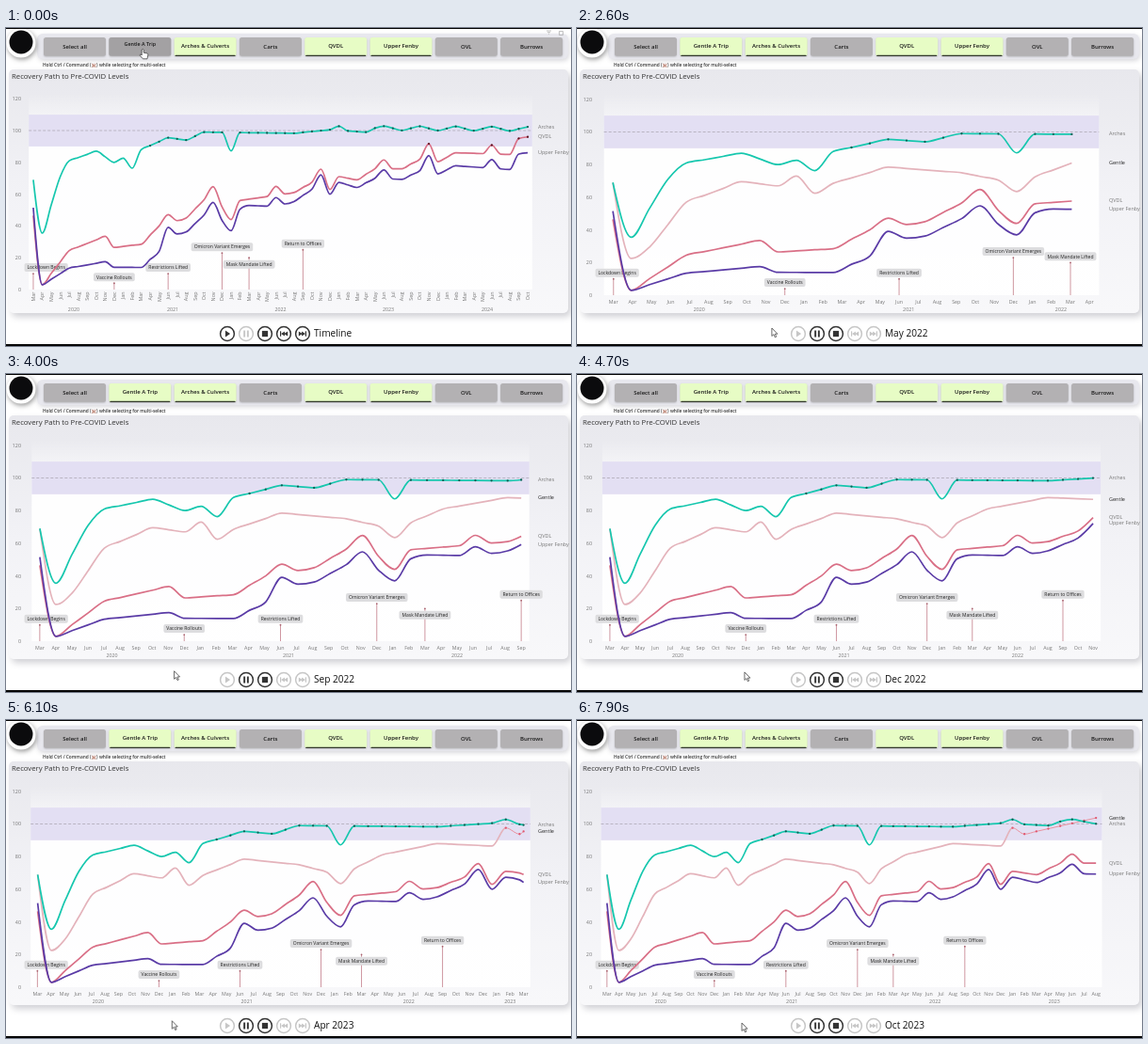
These frames come from a looping animation (600x338 px, 8 s). An HTML page with a canvas:

```html
<!DOCTYPE html>
<html lang="en">
<head>
<meta charset="utf-8">
<title>Recovery dashboard</title>
<style>
html, body { margin: 0; width: 100%; height: 100%; overflow: hidden; background: #fff; }
canvas { display: block; width: 600px; height: 338px; }
</style>
</head>
<body>
<canvas id="stage"></canvas>
<script>
const W = 600, H = 338, LOOP = 8000;
const SELECT_AT = 300, LINE_AT = 500, PLAY_AT = 2400;
const LAST = 55; // months are counted from March 2020
const canvas = document.getElementById('stage');
const ctx = canvas.getContext('2d');
const dpr = window.devicePixelRatio || 1;
canvas.width = W * dpr;
canvas.height = H * dpr;

const MONTHS = ['Jan', 'Feb', 'Mar', 'Apr', 'May', 'Jun', 'Jul', 'Aug', 'Sep', 'Oct', 'Nov', 'Dec'];
const EVENTS = [
  ['Lockdown Begins', 0, 10], ['Vaccine Rollouts', 9, 4], ['Restrictions Lifted', 15, 10],
  ['Omicron Variant Emerges', 21, 23], ['Mask Mandate Lifted', 24, 20], ['Return to Offices', 30, 25]
];
const BUTTONS = ['Select all', 'Gentle A Trip', 'Arches & Culverts', 'Carts', 'QVDL', 'Upper Fenby', 'OVL', 'Burrows'];
const CHOSEN = [1, 2, 4, 5];

// Key points: [time, values...]
const PACE = [[2400, 25.3], [3200, 27.9], [4700, 32.7], [6100, 36.15], [8000, 41.95]];
const POINTER = [[0, 142, 22], [900, 142, 22], [1600, 212, 236], [2200, 235, 323], [3000, 179, 315], [8000, 175, 322]];

const clamp = (v, a, b) => Math.min(b, Math.max(a, v));
const mix = (a, b, p) => a + (b - a) * p;

function along(keys, t, ease = p => p) {
  let i = 0;
  while (i < keys.length - 2 && t >= keys[i + 1][0]) i++;
  const a = keys[i], b = keys[i + 1];
  const p = ease(clamp((t - a[0]) / (b[0] - a[0]), 0, 1));
  return a.slice(1).map((v, k) => mix(v, b[k + 1], p));
}

// Trends by month; dips and seasonal peaks are added below
const ARCH_TREND = [[0, 69], [1, 35.5], [3, 71], [4, 81], [7, 87], [9, 80], [12, 88], [15, 95.5],
  [17, 94], [19, 99], [29, 98.3], [33, 100.5], [37, 99], [38, 101.5], [55, 101]];
const DOOR_TREND = [[0, 69], [1, 22.5], [2, 29.5], [4, 57], [7, 69.5], [9, 67], [10, 73], [12, 68.5],
  [15, 78.5], [19, 75], [21, 70.5], [23, 72.5], [25, 81], [29, 88], [33, 86.5], [34, 97.6],
  [35, 93.8], [41, 103.7], [45, 104], [46, 111], [51, 121.5], [55, 127]];
const RAIL_TREND = [[0, 46.5], [1, 3], [4, 24.5], [8, 33.5], [9, 26.5], [12, 28.5], [14, 40], [17, 45],
  [19, 56.5], [21, 52], [23, 56], [29, 61], [31, 67.5], [33, 63], [34, 71], [36, 69], [38, 76],
  [41, 76], [43, 82], [45, 80.4], [47, 86], [53, 85], [54, 95], [55, 96]];
const VALE_GAP = [[0, -5], [1, 0], [4, 11], [8, 16], [9, 12.5], [14, 16], [15, 8], [20, 10],
  [24, 4], [27, 7], [33, 3], [38, 6], [55, 10]];

const winter = i => i === 11 ? 1 : 0;
const wave = i => i === 22 ? 1 : 0;
const yearly = (i, month) => i > 11 && (i + 2) % 12 === month ? 1 : 0;
const wobble = i => i > 37 ? Math.cos((i - LAST) * Math.PI / 2) : 0;

const arch = i => along(ARCH_TREND, i)[0] - 9 * winter(i) - 11.6 * wave(i) + 1.3 * wobble(i) + (i === 34 ? 2.6 : 0);
const door = i => along(DOOR_TREND, i)[0] - 8.3 * winter(i) - 8 * wave(i);
const rail = i => along(RAIL_TREND, i)[0] - 10 * wave(i) + 10.5 * yearly(i, 10) + 5.5 * yearly(i, 5);
const vale = i => rail(i) - along(VALE_GAP, i)[0];

function series(name, value, color, dot, label = '#777') {
  const data = Array.from({ length: LAST + 1 }, (_, i) => value(i));
  return { name, data, color, dot, label };
}
const doorLine = series('Gentle', door, '#e4b3bb', '#e0566f', '#222');
const archLine = series('Arches', arch, '#16c7ae', '#0c5f54');
const railLine = series('QVDL', rail, '#d96f86', '#5e1222');
const valeLine = series('Upper Fenby', vale, '#5a3ba6', '#2b1a55');
doorLine.hot = '#ea929f';

function text(s, x, y, size, color = '#777', align = 'center', weight = 400) {
  ctx.font = `${weight} ${size}px "Open Sans", "Noto Sans", sans-serif`;
  ctx.fillStyle = color;
  ctx.textAlign = align;
  ctx.textBaseline = 'alphabetic';
  ctx.fillText(s, x, y + size * 0.36);
  return ctx.measureText(s).width;
}

function box(x, y, w, h, r, fill) {
  ctx.beginPath();
  ctx.roundRect(x, y, w, h, r);
  ctx.fillStyle = fill;
  ctx.fill();
}

function shadowed(draw, blur, dx, dy, color) {
  ctx.save();
  ctx.shadowColor = color;
  ctx.shadowBlur = blur * dpr;
  ctx.shadowOffsetX = dx * dpr;
  ctx.shadowOffsetY = dy * dpr;
  draw();
  ctx.restore();
}

function disc(x, y, r, fill) {
  ctx.beginPath();
  ctx.arc(x, y, r, 0, 7);
  ctx.fillStyle = fill;
  ctx.fill();
}

function segment(x1, y1, x2, y2, color, width, dash = []) {
  ctx.beginPath();
  ctx.moveTo(x1, y1);
  ctx.lineTo(x2, y2);
  ctx.setLineDash(dash);
  ctx.strokeStyle = color;
  ctx.lineWidth = width;
  ctx.stroke();
  ctx.setLineDash([]);
}

function xScale(n) {
  const step = 542.6 / (n + 1.836);
  return { step, at: i => 20.2 + step * (0.918 + i) };
}

// Tangents of a monotone cubic through the points
function tangents(p) {
  const gap = i => Math.max(0.01, p[i + 1][0] - p[i][0]);
  const slope = i => (p[i + 1][1] - p[i][1]) / gap(i);
  const e = p.length - 1;
  const m = p.map((q, i) => {
    if (i === 0 || i === e) return 0;
    const h0 = gap(i - 1), h1 = gap(i), s0 = slope(i - 1), s1 = slope(i);
    const mean = (s0 * h1 + s1 * h0) / (h0 + h1);
    return (Math.sign(s0) + Math.sign(s1)) * Math.min(Math.abs(s0), Math.abs(s1), Math.abs(mean) / 2);
  });
  m[0] = (3 * slope(0) - m[1]) / 2;
  m[e] = (3 * slope(e - 1) - m[e - 1]) / 2;
  return m;
}

function curve(p, m, from, to, color, width) {
  if (to <= from) return;
  ctx.beginPath();
  ctx.moveTo(p[from][0], p[from][1]);
  for (let i = from; i < to; i++) {
    const [x0, y0] = p[i], [x1, y1] = p[i + 1], d = (x1 - x0) / 3;
    ctx.bezierCurveTo(x0 + d, y0 + d * m[i], x1 - d, y1 - d * m[i + 1], x1, y1);
  }
  ctx.strokeStyle = color;
  ctx.lineWidth = width;
  ctx.lineJoin = 'round';
  ctx.stroke();
}

function drawSeries(s, n, xOf, yOf) {
  const pts = s.data.slice(0, n + 1).map((v, i) => [xOf(i), yOf(v)]);
  const m = tangents(pts);
  const split = s.hot ? Math.min(n, 34) : n;
  curve(pts, m, 0, split, s.color, 1.7);
  if (s.hot) curve(pts, m, split, n, s.hot, 1);
  pts.forEach(([x, y], i) => { if (s.data[i] >= 90) disc(x, y, 1.15, s.dot); });
}

function drawEndLabels(list, n, yOf) {
  const used = [];
  for (const s of list) {
    const y = yOf(s.data[n]);
    if (used.some(u => Math.abs(u - y) < 5)) continue;
    used.push(y);
    text(s.name, 565, y - 0.5, 5.5, s.label, 'left');
  }
}

function drawEvents(n, xs, yOf) {
  for (const [name, at, value] of EVENTS) {
    if (at > n) continue;
    const x = xs.at(at), y = yOf(value);
    const below = at === 24 && xs.step < 17.5;
    segment(x, y, x, yOf(0), '#cf97a1', 1);
    disc(x, y, 0.9, '#a8616d');
    ctx.font = '400 5px "Open Sans", "Noto Sans", sans-serif';
    const w = ctx.measureText(name).width + 6;
    const left = Math.max(19.5, x - w / 2), mid = y + (below ? 7 : -6.5);
    box(left, mid - 4.5, w, 9, 2, '#dddddf');
    text(name, left + w / 2, mid, 5, '#222');
  }
}

function drawAxes(n, xs, yOf, playing) {
  const l = xs.at(-0.5), r = xs.at(n + 0.5);
  const glow = ctx.createLinearGradient(0, 70, 0, yOf(90));
  glow.addColorStop(0, 'rgba(255,255,255,0)');
  glow.addColorStop(1, 'rgba(255,255,255,.95)');
  ctx.fillStyle = glow;
  ctx.fillRect(l, 70, r - l, yOf(0) - 70);
  ctx.fillStyle = '#e3dff3';
  ctx.fillRect(l, yOf(110), r - l, yOf(90) - yOf(110));
  segment(l, yOf(100), r, yOf(100), '#b5afbd', 0.9, [3, 2]);
  for (let v = 0; v <= 120; v += 20) text(v, 16, yOf(v), 5.4, '#777', 'right');

  const years = {};
  for (let i = 0; i <= n; i++) {
    const x = xs.at(i), month = MONTHS[(i + 2) % 12], year = 2020 + Math.floor((i + 2) / 12);
    (years[year] = years[year] || []).push(x);
    if (playing) {
      text(month, x, 291, 5.3);
    } else {
      ctx.save();
      ctx.translate(x, 280.5);
      ctx.rotate(-Math.PI / 2);
      text(month, 0, 0, 5.4, '#777', 'right');
      ctx.restore();
    }
  }
  for (const y in years) text(y, (years[y][0] + years[y].at(-1)) / 2, 299.5, 5.3);
}

function drawChart(t) {
  const playing = t >= PLAY_AT;
  const pos = playing ? along(PACE, t)[0] : LAST;
  const n = Math.floor(pos), part = pos - n;
  const xs = xScale(n);
  const yOf = playing ? v => 284 - v * 1.735 : v => 278 - v * 1.69;
  let xOf = xs.at;
  if (playing) {
    // Older points slide over while the newest is already in place;
    // at the end of a step the lines make room before the axis does
    const p = clamp(part / 0.55, 0, 1), before = xScale(n - 1);
    xOf = i => i === n ? xs.at(i) : mix(before.at(i), xs.at(i), p);
    if (part > 0.85) xOf = xScale(n + 1).at;
  }
  const shown = t >= LINE_AT ? [doorLine] : [];
  drawAxes(n, xs, yOf, playing);
  drawEvents(n, xs, yOf);
  for (const s of [...shown, archLine, railLine, valeLine]) drawSeries(s, n, xOf, yOf);
  drawEndLabels([archLine, ...shown, railLine, valeLine], n, yOf);
}

function drawHeader(t) {
  shadowed(() => box(33, 6, 564, 27, 6, '#e8e8ee'), 5, 1, 2, 'rgba(60,60,80,.2)');
  BUTTONS.forEach((name, i) => {
    const x = 40 + i * 69.3;
    const hover = i === 1 && t < SELECT_AT;
    const on = CHOSEN.includes(i) && !hover;
    const fill = on ? '#e7fcc5' : hover ? '#a3a1a3' : '#b3b1b3';
    shadowed(() => box(x, 10, 66, 19.8, 2.5, fill), 2, 0, 1, 'rgba(0,0,0,.2)');
    if (on) box(x + 1, 28.8, 64, 1.3, 0.6, '#33382c');
    text(name, x + 33, on ? 18.7 : hover ? 17.5 : 20.3, hover ? 5.4 : 6, '#1a1a1a', 'center', 600);
  });
  shadowed(() => disc(16, 16, 15.5, '#fff'), 5, 1, 2, 'rgba(0,0,0,.4)');
  disc(16, 15, 12.5, '#0b0b0d');
  let x = 39 + text('Hold Ctrl / Command (', 39, 39.5, 4.8, '#333', 'left', 600);
  ctx.font = '5.6px "DejaVu Sans", sans-serif';
  ctx.fillStyle = '#a3553f';
  ctx.fillText('\u2318', x, 41.6);
  x += ctx.measureText('\u2318').width;
  text(') while selecting for multi-select', x, 39.5, 4.8, '#333', 'left', 600);
  if (t < PLAY_AT) {
    for (let i = 0; i < 3; i++) segment(574 + i, 3 + i * 1.6, 579 - i, 3 + i * 1.6, '#aaa', 0.7);
    ctx.strokeStyle = '#aaa';
    ctx.lineWidth = 0.7;
    ctx.strokeRect(587.5, 3.5, 4, 4);
  }
}

function drawPanel() {
  const g = ctx.createLinearGradient(0, 44, 0, 303);
  g.addColorStop(0, '#e8e8ed');
  g.addColorStop(0.5, '#f2f2f6');
  g.addColorStop(1, '#f8f8fa');
  shadowed(() => box(3, 44, 594, 259, 5, g), 7, 3, 4, 'rgba(60,60,80,.24)');
  text('Recovery Path to Pre-COVID Levels', 6, 51, 7.75, '#333', 'left', 500);
}

function triangle(x, dir, size) {
  ctx.beginPath();
  ctx.moveTo(x - dir * size * 0.6, 325 - size);
  ctx.lineTo(x + dir * size * 0.9, 325);
  ctx.lineTo(x - dir * size * 0.6, 325 + size);
  ctx.fill();
}

function skip(x, dir) {
  ctx.fillRect(x + dir * 3.4 - 0.6, 322.3, 1.2, 5.4);
  triangle(x + dir * 0.6, dir, 2.6);
  triangle(x - dir * 2.6, dir, 2.6);
}

const ICONS = [
  x => triangle(x, 1, 3.4),
  x => { for (const d of [-2.8, 0.9]) ctx.fillRect(x + d, 321.5, 1.9, 7); },
  x => ctx.fillRect(x - 3.1, 321.9, 6.2, 6.2),
  x => skip(x, -1),
  x => skip(x, 1)
];

function drawControls(t) {
  const playing = t >= PLAY_AT;
  ICONS.forEach((icon, i) => {
    const x = 235 + i * 20;
    const active = playing ? i === 1 || i === 2 : i !== 1;
    const color = active ? '#333' : '#c6c6c6';
    ctx.beginPath();
    ctx.arc(x, 325, 7.4, 0, 7);
    ctx.strokeStyle = color;
    ctx.lineWidth = 1.5;
    ctx.stroke();
    ctx.fillStyle = color;
    icon(x);
  });
  let label = 'Timeline';
  if (playing) {
    const i = Math.floor(30.3 + (t - 3200) / 310);
    label = `${MONTHS[i % 12]} ${2020 + Math.floor(i / 12)}`;
  }
  text(label, 327, 324.8, 10.1, '#111', 'left');
}

const ARROW = new Path2D('M0 0V8.5L2 6.7L3.4 9.8L4.8 9.2L3.4 6.2H6Z');
const HAND = new Path2D('M2.2 1Q3.4 -.2 4.2 1V4.2L8 5Q9 5.4 8.8 6.6L8 10.8H3.4L.2 7.2Q0 5.8 1.2 6L2.2 7Z');

function drawPointer(t) {
  const [x, y] = along(POINTER, t, p => p * p * (3 - 2 * p));
  const shape = t < 950 ? HAND : ARROW;
  ctx.save();
  ctx.translate(x, y);
  ctx.fillStyle = '#fff';
  ctx.fill(shape);
  ctx.strokeStyle = '#444';
  ctx.lineWidth = 0.8;
  ctx.stroke(shape);
  ctx.restore();
}

const start = performance.now();
function frame() {
  const t = (performance.now() - start) % LOOP;
  ctx.setTransform(dpr, 0, 0, dpr, 0, 0);
  ctx.fillStyle = '#fff';
  ctx.fillRect(0, 0, W, H);
  drawHeader(t);
  drawPanel();
  drawChart(t);
  drawControls(t);
  drawPointer(t);
  ctx.fillStyle = '#000';
  ctx.fillRect(0, 0, W, 1);
  ctx.fillRect(0, 336, W, 2);
  requestAnimationFrame(frame);
}
frame();
</script>
</body>
</html>
```
